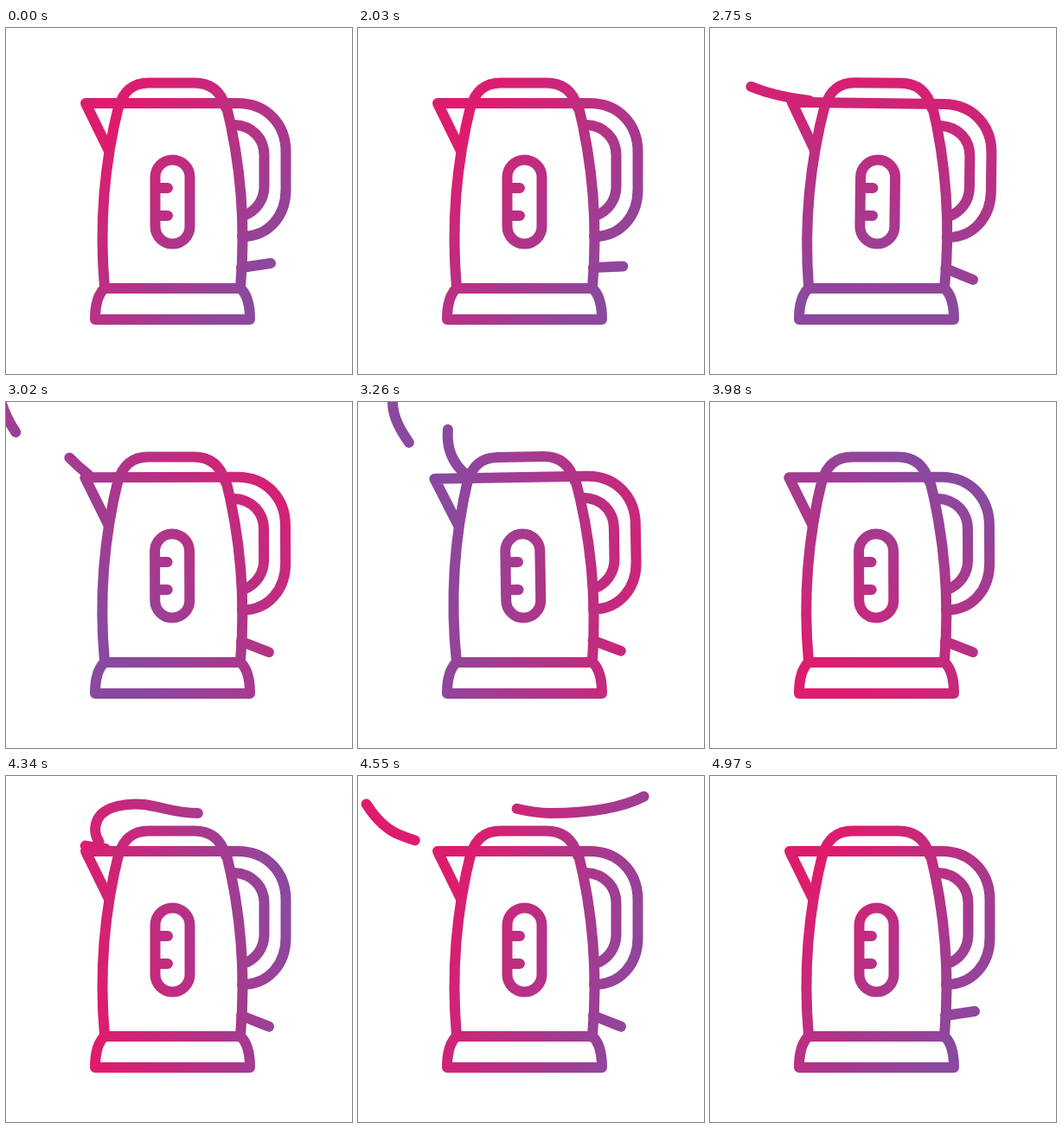
An HTML page for the animation above (5660 ms loop, 400x400 px).

```html
<!DOCTYPE html>
<html lang="en">
<head>
<meta charset="utf-8">
<title>Boiling kettle</title>
<style>
  html, body { margin: 0; width: 100%; height: 100%; overflow: hidden; background: #fff; }
  svg { display: block; width: 100%; height: 100%; }
  .ink { fill: none; stroke: url(#tint); stroke-width: 12; stroke-linecap: round; stroke-linejoin: round; }
</style>
</head>
<body>
<svg viewBox="0 0 400 400">
  <defs>
    <linearGradient id="tint" gradientUnits="userSpaceOnUse" x1="92" y1="200" x2="338" y2="200">
      <stop offset="0" stop-color="#de1c6e"/>
      <stop offset="1" stop-color="#8a499f"/>
    </linearGradient>
  </defs>
  <g class="ink">
    <g id="steam"></g>
    <g id="body">
      <path id="lever" d="M272 277L306 272"/>
      <path d="M130 92C135 75 145 63.5 165 63.5H218C238 63.5 249 75 254 92"/>
      <path d="M114 300C107 220 115 150 131 87M254 87C270 150 278 220 271 300"/>
      <path d="M119 142L92 87H268C302 87 323.5 112 323.5 143V187C323.5 217 304 241 273 241"/>
      <path d="M264 112C285 113 298.5 128 298.5 147V183C298.5 200 288 212 275 217"/>
      <rect x="172.5" y="152.5" width="40" height="97" rx="20"/>
      <path d="M173 185H187M173 217H187"/>
    </g>
    <path d="M114 301H271C279 308 282 320 282 337H103C103 320 106 308 114 301Z"/>
  </g>
</svg>
<script>
const LOOP = 5660;
const byId = id => document.getElementById(id);
const tint = byId('tint'), body = byId('body'), lever = byId('lever');

const left = 'M115 84C90 81 70 77 48 68S2 30 -8 -8';
const puffs = [
  { d: left, start: 2605, speed: .45, size: 72 },
  { d: 'M95 84C80 72 68 60 59 47S40 18 40 0V-20', start: 2968, speed: .47, size: 90 },
  { d: 'M125 84C108 70 102 52 104 31C106 -2 165 8 202 14S242 16 265 9S310 -10 320 -20', start: 3150, speed: .49, size: 66 },
  { d: 'M95 84C82 66 80 48 85 30S105 0 125 -12', start: 3388, speed: .5, size: 65 },
  { d: 'M115 84C104 76 100 62 106 50C114 34 142 31 160 33C182 36 196 43 222 43C290 43 345 30 366 -10', start: 4047, speed: .53, size: 150 },
  { d: left, start: 4300, speed: .47, size: 72 }
];

for (const p of puffs) {
  p.el = document.createElementNS('http://www.w3.org/2000/svg', 'path');
  p.el.setAttribute('d', p.d);
  p.el.setAttribute('stroke-dasharray', `${p.size} 2000`);
  byId('steam').append(p.el);
  p.length = p.el.getTotalLength();
}

// Gradient direction in degrees over time
const turn = [[2400, 38], [2750, 90], [3260, 186], [3620, 248], [4340, 350], [4760, 398]];

function sample(keys, t) {
  if (t <= keys[0][0]) return keys[0][1];
  for (let i = 1; i < keys.length; i++) {
    const [t0, a] = keys[i - 1], [t1, b] = keys[i];
    if (t < t1) return a + (b - a) * (t - t0) / (t1 - t0);
  }
  return keys[keys.length - 1][1];
}

const progress = (t, start, time) => Math.min(1, Math.max(0, (t - start) / time));
const easeOut = (t, start, time) => Math.sin(progress(t, start, time) * Math.PI / 2);

function rotate(el, angle, x, y, attr = 'transform') {
  el.setAttribute(attr, `rotate(${angle.toFixed(3)} ${x} ${y})`);
}

function draw(t) {
  rotate(tint, sample(turn, t), 215, 200, 'gradientTransform');
  // The pink end moves outward while the gradient turns
  tint.setAttribute('x1', 92 - 52 * Math.sin(progress(t, 2250, 2000) * Math.PI));
  rotate(lever, 30 * (easeOut(t, 2000, 330) - easeOut(t, 4640, 330)), 272, 277);
  const shaking = t > 2560 && t < 4320;
  rotate(body, shaking ? Math.sin((t - 2720) / 320 * 2 * Math.PI) : 0, 192, 300);
  for (const p of puffs) {
    const head = (t - p.start) * p.speed;
    const seen = head > 0 && head - p.size < p.length;
    p.el.setAttribute('visibility', seen ? 'visible' : 'hidden');
    p.el.setAttribute('stroke-dashoffset', p.size - head);
  }
}

const begin = performance.now();
function frame() {
  // The picture advances in steps of 30 ms
  const t = (performance.now() - begin) % LOOP;
  draw(Math.floor((t + 10) / 30) * 30);
  requestAnimationFrame(frame);
}
draw(0);
requestAnimationFrame(frame);
</script>
</body>
</html>
```
